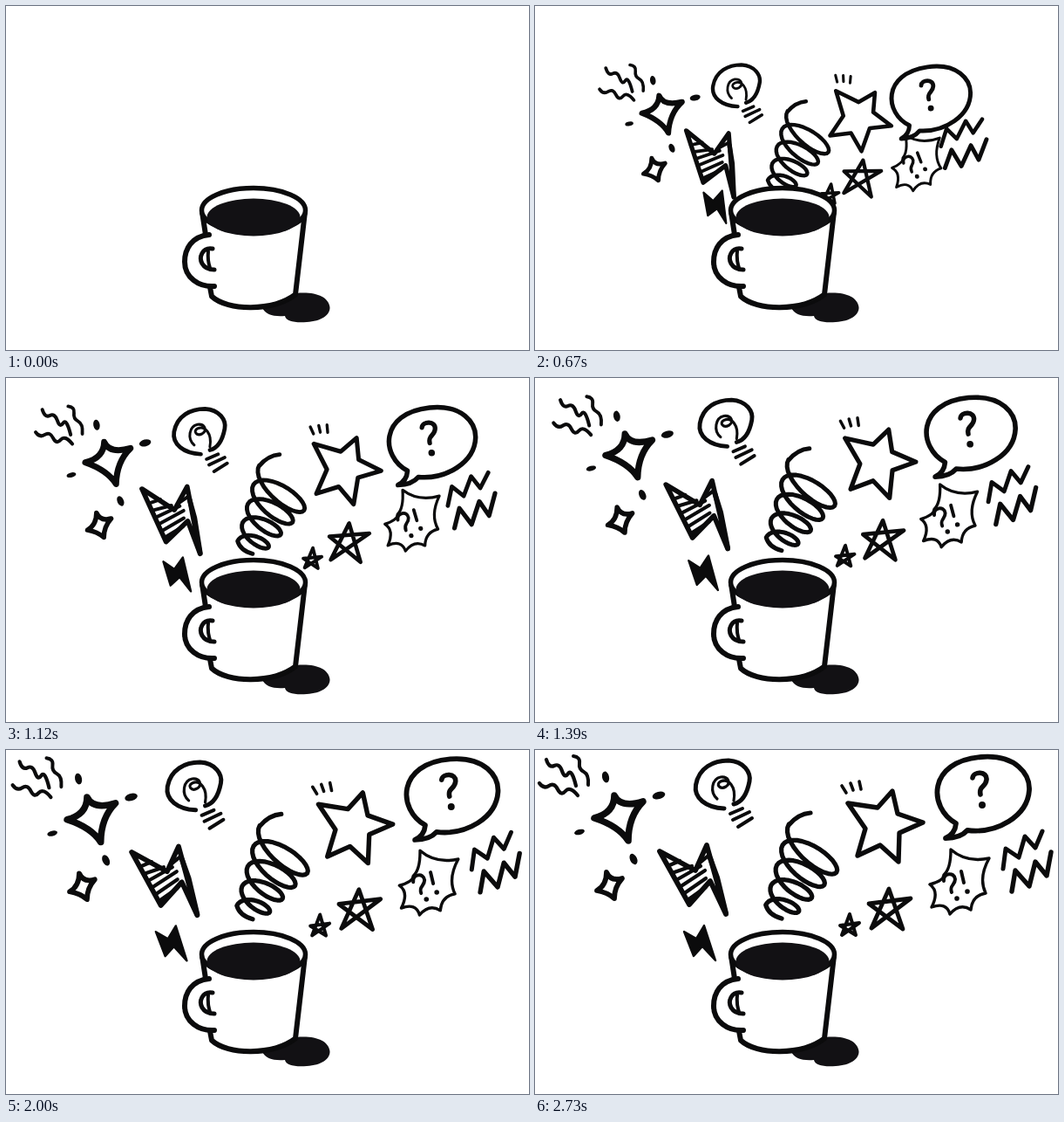
An HTML page that plays this animation: 600x394 px, repeating every 2760 ms.

```html
<!DOCTYPE html>
<html lang="en">
<head>
<meta charset="utf-8">
<title>Coffee ideas</title>
<style>
  html, body { margin: 0; width: 100%; height: 100%; overflow: hidden; background: #fff; }
  svg { display: block; width: 100vw; height: 100vh; }
  path, ellipse { stroke: #0b0b0c; stroke-linecap: round; stroke-linejoin: round; fill: none; }
  .solid { fill: #0b0b0c; }
  .paper { fill: #fff; }
  .dark { fill: #121114; stroke: none; }
  .bare { stroke: none; }
</style>
</head>
<body>
<svg viewBox="0 0 600 394">
  <g id="doodles"></g>
  <g id="cup" stroke-width="6">
    <path class="dark" d="M294 345C297 354 308 356 320 355C321 361 331 363 345 362C362 361 372 354 371.500 345C370 333 355 327 333 329Z"/>
    <path class="paper bare" d="M225 238L232 262Q231 292 236 333C254 350 306 351 332 330L343 238Z"/>
    <path d="M225 236L229 262M234 322L236 332.500C254 349.500 306 350 332 330.500L343 236"/>
    <ellipse class="paper" cx="284" cy="234" rx="59.500" ry="25.500" stroke-width="5.500"/>
    <ellipse class="dark" cx="284" cy="242" rx="53.500" ry="21.500"/>
    <path d="M233 262C213 264 205 278 205 293C205 311 221 322 239 321"/>
    <path d="M237 278C225 276 221 288 225 295Q229 302 239 302" stroke-width="5"/>
    <path d="M232 281Q231 291 234 300" stroke-width="4"/>
  </g>
</svg>
<script>
const LOOP = 2760;

const line = (d, w, cls = '') => `<path class="${cls}" d="${d}" stroke-width="${w}"/>`;
const dot = (x, y, rx, ry = rx, turn = 0) =>
  `<ellipse class="solid bare" cx="${x}" cy="${y}" rx="${rx}" ry="${ry}" transform="rotate(${turn} ${x} ${y})"/>`;

// Spikes joined by edges that sag towards the centre
function burst(cx, cy, pts, sag) {
  let d = `M${pts[0]}`;
  pts.forEach(([x, y], i) => {
    const [u, v] = pts[(i + 1) % pts.length];
    const mx = (x + u) / 2, my = (y + v) / 2;
    d += `Q${mx + (cx - mx) * sag} ${my + (cy - my) * sag} ${u} ${v}`;
  });
  return d + 'Z';
}

// Tilted coil that narrows as it goes down
function coil() {
  let d = 'M316 72Q302 73 291 86';
  const n = 120;
  for (let i = 0; i <= n; i++) {
    const u = i / n, a = Math.PI * (1 - 8 * u);
    const tilt = (38 - 12 * u) * Math.PI / 180;
    const px = (39 - 22 * u) * Math.cos(a), py = (16 - 7 * u) * Math.sin(a);
    const x = 322 - 42 * u + px * Math.cos(tilt) - py * Math.sin(tilt);
    const y = 109 + 76 * u + px * Math.sin(tilt) + py * Math.cos(tilt);
    d += `L${x.toFixed(1)} ${y.toFixed(1)}`;
  }
  return d + 'Q268 189 283 193';
}

// at: resting centre, from: start centre, size and turn: values at the start
const items = [
  { at: [33, 29], from: [285, 251], size: .6, turn: 0, art:
    line('M44 7Q52 8 51 15T56 25T61 40', 4) +
    line('M13 11Q16 21 22 18T31 24T38 27T47 41', 4.2) +
    line('M5 38Q10 45 16 41T26 45T35 47T49 52', 4.2) },
  { at: [96, 77], from: [284, 253], size: .28, turn: 12, art:
    line('M91 52Q98 67 124 59Q107 76 107 104Q96 87 68 78Q91 72 91 52Z', 7.6) +
    dot(81, 31, 4, 6.5, -12) + dot(142, 52, 7.5, 4.2, -15) +
    dot(51, 94, 6, 3, -15) + dot(113, 125, 4, 6.5, -25) },
  { at: [85, 155], from: [281, 277], size: .45, turn: 0, art:
    line('M82 140Q87 151 100 147Q91 157 91 170Q83 163 71 161Q82 155 82 140Z', 5.8) },
  { at: [181, 148], from: [259, 260], size: .6, turn: 42, art:
    line('M143 116L184 138L197 109L219 188L201 150L177 177Z', 5.8) +
    line('M152 133L166 127M157 141L180 133M162 149L190 133M166 157L195 138M170 165L196 147M175 172L196 157M189 129L200 120', 4.2) +
    line('M201 124L209 146L219 187', 6) },
  { at: [190, 221], from: [258, 249], size: .6, turn: 42, art:
    line('M171 208L185 216L194 201L207 241L192 225L182 236Z', 2.4, 'solid') },
  { at: [215, 40], from: [275, 237], size: .5, turn: 0, art:
    line('M217 67C196 66 182 55 184.500 40C188 20 205 12 222 12C240 13 248 26 246 36C243 52 236 60 228 62', 5) +
    line('M209 56C200 48 203 33 213 31C222 30 225 38 219 42C212 46 207 39 213 36C222 32 231 42 228 58', 3.2) +
    line('M224 73L238 67M227 80L246 71M233 88L249 78', 4) },
  { at: [306, 132], from: [292, 241], size: .45, turn: 0, art: line(coil(), 5.2) },
  { at: [402, 89], from: [290, 249], size: .42, turn: 68, art:
    line('M359 61L393 66L410 47L416 73L445 83L418 95L417 128L396 109L370 121L379 90Z', 5.4) +
    line('M352 41L357 49M362 38L365 46M372 36L374 45', 3.6) },
  { at: [406, 183], from: [284, 239], size: .55, turn: 25, art:
    line('M406 159L386 204L431 170L383 176L422 205Z', 4.8) },
  { at: [361, 200], from: [276, 256], size: .6, turn: 20, art:
    line('M361 188L352 212L372 198L350 201L368 212Z', 4) },
  { at: [486, 152], from: [302, 257], size: .5, turn: -32, art:
    line(burst(486, 152, [[477, 114], [521, 124], [517, 164], [500, 183], [476, 188], [455, 180], [453, 154], [469, 143]], .32), 3.4, 'paper') +
    line('M469 150C468 141 481 139 482 148C482 155 475 155 478 163', 4) +
    line('M489 139L492 152', 4) + dot(484, 170, 2.8) + dot(496, 162, 2.8) },
  { at: [514, 48], from: [286, 262], size: .47, turn: -14, art:
    line('M483 84C451 66 450 13 512 8C552 5 568 28 567 46C565 76 530 96 496 92Q488 101 471 101Q482 96 483 84Z', 5.8, 'paper') +
    line('M502 32C503 24 519 24 518 34C517 43 509 41 511 51', 5.6) + dot(513, 63, 4) },
  { at: [566, 127], from: [288, 243], size: .65, turn: 40, art:
    line('M537 136L540 113L555 123L562 99L574 112L582 93', 5) +
    line('M547 162L551 138L567 156L574 128L587 144L592 117', 5.4) }
];

const stage = document.getElementById('doodles');
stage.innerHTML = items.map(o => `<g>${o.art}</g>`).join('');
items.forEach((o, i) => o.node = stage.children[i]);

// Distance still to go: [ms, share]
const path = [[0, 1], [150, .995], [300, .92], [400, .76], [460, .62], [520, .46], [550, .39], [600, .318],
  [700, .246], [880, .175], [1090, .117], [1390, .062], [1670, .028], [2000, .01], [2300, .003], [2760, 0]];

function remaining(t) {
  let i = 0;
  while (i < path.length - 2 && t >= path[i + 1][0]) i++;
  const slope = k => {
    if (k === 0 || k === path.length - 1) return 0;
    const a = path[k - 1], b = path[k + 1];
    return (b[1] - a[1]) / (b[0] - a[0]);
  };
  const [x, y] = path[i], [u, v] = path[i + 1];
  const h = u - x, s = (t - x) / h, r = 1 - s;
  return y * r * r * (1 + 2 * s) + slope(i) * h * s * r * r
    + v * s * s * (3 - 2 * s) - slope(i + 1) * h * s * s * r;
}

function draw(t) {
  const q = remaining(t);
  for (const { at: [x, y], from: [u, v], size, turn, node } of items) {
    node.setAttribute('transform',
      `translate(${x + (u - x) * q} ${y + (v - y) * q}) rotate(${turn * q}) ` +
      `scale(${1 - (1 - size) * q}) translate(${-x} ${-y})`);
  }
}

const start = performance.now();
function tick() {
  draw((performance.now() - start) % LOOP);
  requestAnimationFrame(tick);
}
tick();
</script>
</body>
</html>
```
